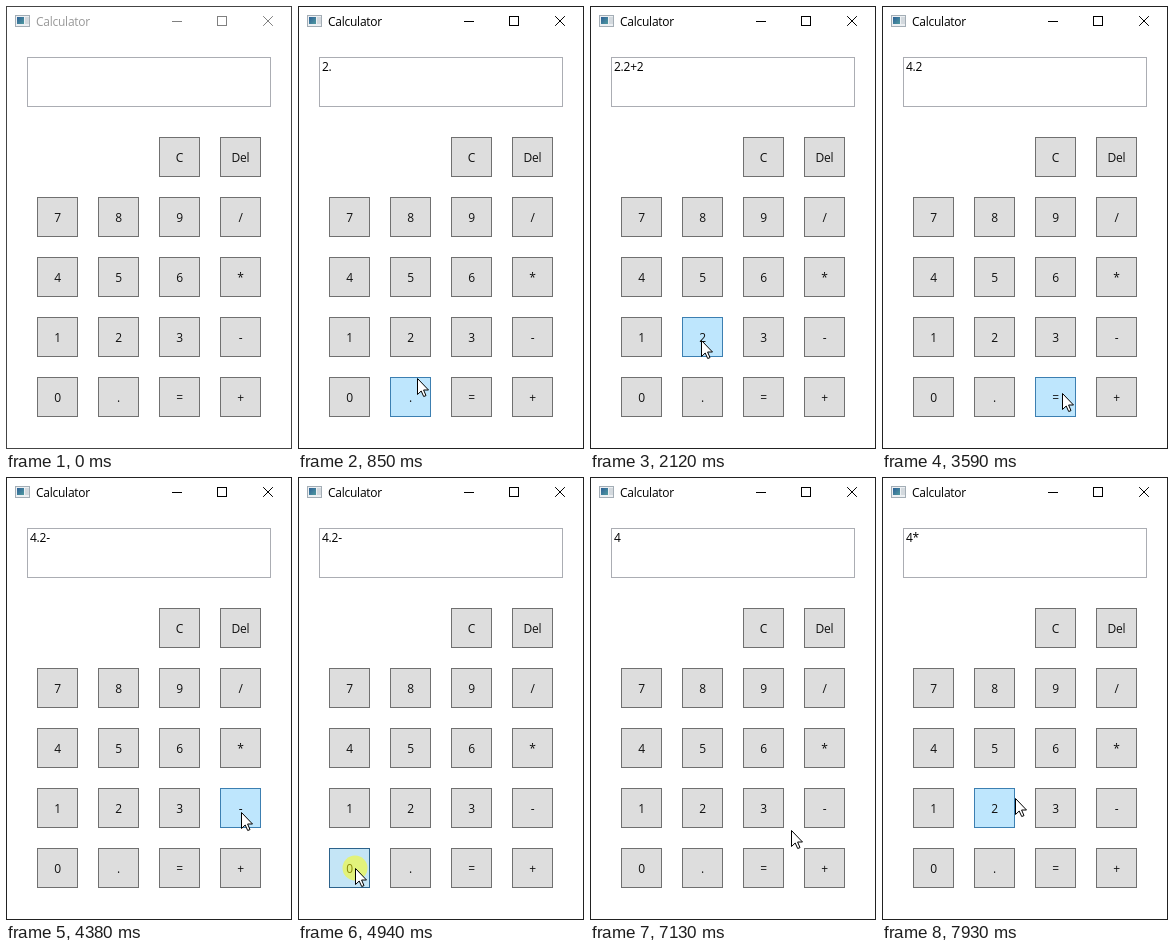
Recreate the animation shown at these times as an HTML page. Size 286 px wide and 443 px high, loop 8 s.

```html
<!DOCTYPE html>
<html lang="en">
<head>
<meta charset="utf-8">
<title>Calculator</title>
<style>
html, body { margin: 0; width: 100%; height: 100%; overflow: hidden; background: #fff; }
svg { display: block; width: 286px; height: 443px; }
text { font: 12px "Open Sans", "Noto Sans", sans-serif; letter-spacing: -.25px; fill: #000; white-space: pre; }
rect { shape-rendering: crispEdges; }
.key text { text-anchor: middle; fill: #111; }
.key rect { fill: #ddd; stroke: #707070; }
.key.hover rect { fill: #bee6fd; stroke: #3c7fb1; }
.key.down rect { fill: #c4e5f6; stroke: #2c628b; }
</style>
</head>
<body>
<svg viewBox="0 0 286 443">
  <defs>
    <linearGradient id="pane" x2="1" y2="1">
      <stop stop-color="#2d5f96"/><stop offset="1" stop-color="#4f9aa0"/>
    </linearGradient>
  </defs>
  <rect width="286" height="443" fill="#fff"/>
  <rect id="frame" x=".5" y=".5" width="285" height="442" fill="none"/>
  <rect x="9.5" y="9.5" width="14" height="11" fill="#edf0f3" stroke="#a3adb5"/>
  <rect x="11" y="11" width="7" height="7" fill="url(#pane)"/>
  <rect x="19" y="11" width="4" height="7" fill="#d3d9de"/>
  <text id="title" x="30" y="20">Calculator</text>
  <g id="controls" fill="none">
    <path d="M166 15.5H176M211.5 10.5H220.5V19.5H211.5Z" shape-rendering="crispEdges"/>
    <path d="M257.5 10.5L266.5 19.5M266.5 10.5L257.5 19.5" stroke-linecap="square"/>
  </g>
  <rect x="21.5" y="51.5" width="243" height="49" fill="#fff" stroke="#abadb3"/>
  <text id="display" x="24" y="65"></text>
  <g id="keys"></g>
  <circle id="spot" r="12.5" fill="#ff0" fill-opacity=".5"/>
  <path id="cursor" d="M.5 .5V16.5L4.2 13L6.7 18.5L9 17.6L6.6 12H11.5Z" fill="#fff" stroke="#000"/>
</svg>
<script>
// The screen refreshes in even steps; the script below counts in these steps.
const LOOP = 8000, STEP = 78.4, LEAD = 17, LAST = 101;
const KEY_W = 41, KEY_H = 40;
const $ = id => document.getElementById(id);

function add(parent, tag, attrs) {
  const el = document.createElementNS('http://www.w3.org/2000/svg', tag);
  for (const k in attrs) el.setAttribute(k, attrs[k]);
  return parent.appendChild(el);
}

const keys = {};
['  CD', '789/', '456*', '123-', '0.=+'].forEach((row, r) => [...row].forEach((name, c) => {
  if (name === ' ') return;
  const x = 31 + 61 * c, y = 131 + 60 * r;
  const el = add($('keys'), 'g', { class: 'key' });
  add(el, 'rect', { x: x + .5, y: y + .5, width: KEY_W - 1, height: KEY_H - 1 });
  add(el, 'text', { x: x + 20.5, y: y + 25 }).textContent = name === 'D' ? 'Del' : name;
  keys[name] = { el, x, y };
}));

// A visit to a key: where the pointer rests on it and when it presses.
const visit = (name, dx, dy, down, times) => ({
  name, x: keys[name].x + dx, y: keys[name].y + dy,
  arrive: down - 1, down, up: down + 1, leave: down + 1, ...times
});
const entry = { x: 150, y: 424, leave: 1 };
const visits = [
  visit('2', 24, 29, 4),
  visit('.', 30, 14, 9, { up: 11, leave: 10 }),
  visit('2', 19, 23, 14),
  visit('+', 21, 28, 19),
  visit('2', 19, 23, 26),
  visit('=', 24, 19, 37, { arrive: 32, leave: 45 }),
  visit('-', 21, 24, 55, { arrive: 52 }),
  visit('0', 26, 20, 63),
  visit('.', 25, 20, 68),
  visit('2', 22, 26, 72),
  visit('=', 25, 26, 84, { arrive: 78, up: 86, leave: 89 }),
  visit('*', 28, 21, 95),
  visit('2', 14, 22, 104)
];

const ease = f => f * f * (3 - 2 * f);

function pointerAt(k) {
  let from = entry;
  for (const to of visits) {
    if (k < to.arrive) {
      const f = ease(Math.max(0, (k - from.leave) / (to.arrive - from.leave)));
      return [from.x + (to.x - from.x) * f, from.y + (to.y - from.y) * f].map(Math.round);
    }
    if (k <= to.leave) return [to.x, to.y];
    from = to;
  }
}

function solve(text) {
  const [, a, op, b] = text.match(/^([\d.]+)([-+*\/])([\d.]+)$/);
  const result = { '+': +a + +b, '-': a - b, '*': a * b, '/': a / b }[op];
  return String(+result.toFixed(8));
}

const displayAt = k => visits.filter(v => k >= v.up)
  .reduce((text, v) => v.name === '=' ? solve(text) : text + v.name, '');

function render(time) {
  const k = Math.min(LAST, Math.floor((time + LEAD) / STEP));
  const shown = k >= entry.leave, active = k >= visits[0].down;
  const down = visits.some(v => k >= v.down && k < v.up);
  const [x, y] = pointerAt(k);

  $('display').textContent = displayAt(k);
  $('frame').setAttribute('stroke', active ? '#222' : '#444');
  $('title').style.fill = active ? '#000' : '#999';
  $('controls').setAttribute('stroke', active ? '#000' : '#808080');
  for (const key of Object.values(keys)) {
    const over = shown && x >= key.x && x <= key.x + KEY_W && y >= key.y && y <= key.y + KEY_H;
    key.el.setAttribute('class', 'key' + (over ? down ? ' down' : ' hover' : ''));
  }
  for (const [id, visible] of [['cursor', shown], ['spot', down]]) {
    $(id).setAttribute('visibility', visible ? 'visible' : 'hidden');
    $(id).setAttribute('transform', `translate(${x} ${y})`);
  }
}

const start = performance.now();
function loop() {
  render((performance.now() - start) % LOOP);
  requestAnimationFrame(loop);
}
loop();
</script>
</body>
</html>
```
